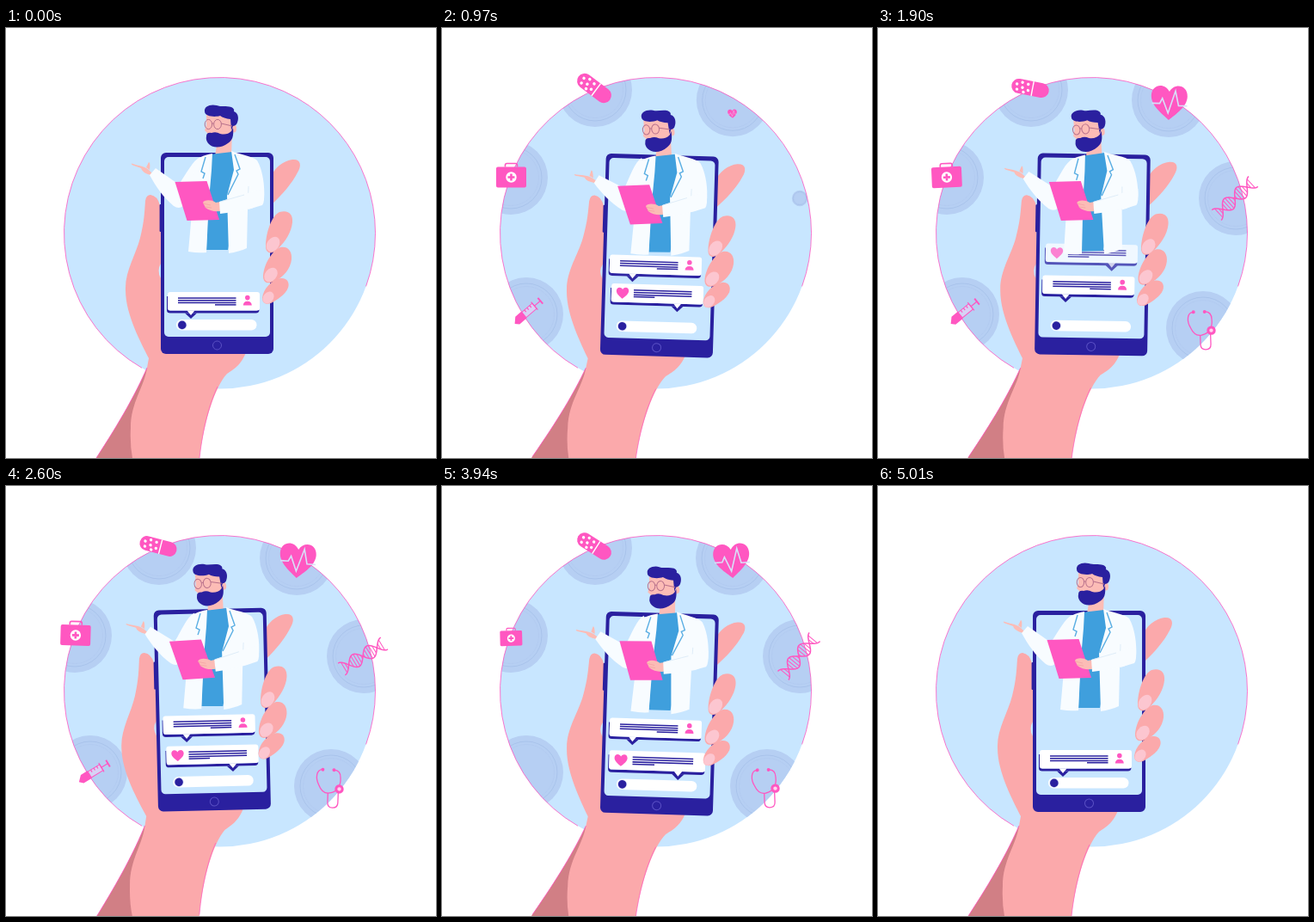
Recreate the animation shown at these times as an HTML page with a canvas. Size 500 by 500 pixels, loop 5050 ms.

```html
<!DOCTYPE html>
<html lang="en">
<head>
<meta charset="utf-8">
<title>Online doctor</title>
<style>
html, body { margin: 0; width: 100%; height: 100%; overflow: hidden; background: #fff; }
canvas { display: block; width: 500px; height: 500px; }
</style>
</head>
<body>
<canvas id="stage" width="500" height="500"></canvas>
<script>
const c = document.getElementById('stage').getContext('2d');
const LOOP = 5050, RAD = Math.PI / 180, TAU = Math.PI * 2;
const SKY = '#c8e6ff', NAVY = '#2a209f', PINK = '#ff57c1', SKIN = '#fba9ab',
  NAIL = '#fcc6d0', SHADE = '#d17f85', DISC = '#b6cff3', RING = '#a8c2ea',
  COAT = '#f8fcff', BLUE = '#3f9fdd', FACE = '#fcbcb6';

const clamp = x => Math.max(0, Math.min(1, x));
const smooth = x => (1 - Math.cos(Math.PI * clamp(x))) / 2;
const back = (x, k) => {
  const u = clamp(x) - 1;
  return 1 + (k + 1) * u ** 3 + k * u * u;
};

// Eased value through [time, value] points
function key(t, pts) {
  for (let i = 1; i < pts.length; i++) {
    const [a, va] = pts[i - 1], [b, vb] = pts[i];
    if (t <= b) return va + (vb - va) * smooth((t - a) / (b - a));
  }
  return pts[pts.length - 1][1];
}

function shape(d, fill, stroke, width = 1) {
  const p = new Path2D(d);
  if (fill) { c.fillStyle = fill; c.fill(p); }
  if (stroke) { c.strokeStyle = stroke; c.lineWidth = width; c.stroke(p); }
}
function oval(x, y, rx, ry, fill, stroke, width = 1, turn = 0) {
  c.beginPath();
  c.ellipse(x, y, rx, ry, turn * RAD, 0, TAU);
  if (fill) { c.fillStyle = fill; c.fill(); }
  if (stroke) { c.strokeStyle = stroke; c.lineWidth = width; c.stroke(); }
}
const dot = (x, y, r, fill, stroke, width) => oval(x, y, r, r, fill, stroke, width);
function box(x, y, w, h, r, fill) {
  c.beginPath();
  c.roundRect(x, y, w, h, r);
  c.fillStyle = fill;
  c.fill();
}
function turned(x, y, deg, draw, scale = 1) {
  c.save();
  c.translate(x, y);
  c.rotate(deg * RAD);
  c.scale(scale, scale);
  c.translate(-x, -y);
  draw();
  c.restore();
}

// Icons are drawn around their own centre
function pill() {
  box(-22, -8.5, 44, 17, 8.5, PINK);
  c.fillStyle = '#fff';
  c.fillRect(2, -8.5, 1.4, 17);
  [[-16, -2], [-15, 4], [-10, -5], [-9, 1], [-7, 6], [-3, -4], [-2, 3]]
    .forEach(([x, y]) => dot(x, y, 1.7, '#fff'));
}
function kit() {
  shape('M-7 -12V-14Q-7 -16 -5 -16H5Q7 -16 7 -14V-12', null, PINK, 1.6);
  box(-17.5, -12, 35, 24, 2, PINK);
  dot(0, 0, 6.2, '#fff');
  shape('M0 -4V4M-4 0H4', null, PINK, 2.6);
}
function syringe() {
  shape('M-23 1L-17 -5H-8V5H-19Z', PINK);
  shape('M-8 -4H8V4H-8Z', '#d7d2f5', PINK, 1);
  shape('M-4 -4V-1M0 -4V-1M4 -4V-1M8 -6V6M8 0H17', null, PINK, 1.2);
  shape('M17 -4.5V4.5', null, PINK, 2);
}
function heart() {
  shape('M0 20C-8 13 -21 4 -21 -8C-21 -21 -6 -24 0 -13C6 -24 21 -21 21 -8C21 4 8 13 0 20Z', PINK);
  shape('M-20 1H-11L-8 -5L-1 12L7 -14L11 3H21', null, '#d8e0f9', 1.6);
}
function dna() {
  const wave = x => 8 * Math.sin(x / 6.1);
  for (const side of [-1, 1]) {
    c.beginPath();
    for (let x = -29; x <= 29; x++) c.lineTo(x, side * wave(x));
    c.strokeStyle = PINK;
    c.lineWidth = 1.5;
    c.stroke();
  }
  for (let x = -25.5; x <= 26; x += 3.4) shape(`M${x} ${-wave(x)}V${wave(x)}`, null, PINK, 1);
}
function stethoscope() {
  shape('M-9 -20C-17 -20 -17 -9 -13 -2C-10 5 -5 8 0 7C8 6 13 -2 12 -11C12 -17 9 -20 4 -20', null, PINK, 1.3);
  shape('M-2 7V18Q-2 24 4 24Q10 24 10 18V6', null, PINK, 1.3);
  dot(-9, -20, 2, PINK);
  dot(4, -20, 2, PINK);
  dot(11, 2, 5.2, PINK);
  dot(11, 2, 2.2, '#ffd3ef');
}

// x, y: icon centre; px, py: pivot; tilt: [middle, swing, peak time]
const items = [
  { draw: syringe, x: 102.5, y: 329.5, px: 84, py: 346, disc: [98, 333], tilt: [-37, 6, 2750] },
  { draw: kit, x: 80.5, y: 173.5, px: 81, py: 187, disc: [80, 174], tilt: [0, 3, 3025] },
  { draw: pill, x: 177, y: 70, px: 177, py: 70, disc: [178, 72], tilt: [23, 15, 800] },
  { draw: heart, x: 338, y: 87, px: 338, py: 104, disc: [338, 84], tilt: [0, 4.5, 2400] },
  { draw: dna, x: 415, y: 198, px: 415, py: 198, disc: [416, 198], tilt: [-41, 10, 2650] },
  { draw: stethoscope, x: 376.5, y: 350, px: 377, py: 352, disc: [378, 349], tilt: [0, 3, 2900] }
];
const popped = (t, on, off, k) =>
  t < on || t > off + 220 ? 0 : t < off ? back((t - on) / 300, k) : 1 - smooth((t - off) / 250);

function discs(t) {
  c.save();
  c.beginPath();
  c.arc(248.5, 238.5, 181, 0, TAU);
  c.clip();
  items.forEach(({ disc: [x, y] }, i) => {
    const on = 100 + 200 * i, off = 3960 + 165 * i;
    const s = t < off ? smooth((t - on + 30) / 330) * (t > on) : popped(t, on, off, 0);
    if (s <= 0.01) return;
    dot(x, y, 43 * s, DISC);
    dot(x, y, 36 * s, null, RING, .9);
    dot(x, y, 32.5 * s, null, '#b0c9ef', .7);
  });
  c.restore();
}
function icons(t) {
  items.forEach((it, i) => {
    const s = popped(t, 350 + 200 * i, 3690 + 165 * i, 1);
    if (s <= 0.01) return;
    const [mid, swing, peak] = it.tilt;
    const wave = swing * Math.cos(TAU * (t - peak) / 2750);
    turned(it.px, it.py, wave, () => {
      c.translate(it.x, it.y);
      c.rotate(mid * RAD);
      it.draw();
    }, s);
  });
}

function hand() {
  shape('M98 512L105 500C133 457 151 425 164 395L166 384C157 366 139 333 139 305C138 283 151 264 156 244C161 224 161 214 162 201Q163 194 168 194Q176 195 179 206L184 372H281C275 391 266 396 257 402C243 417 230 458 225 500L224 512Z', SKIN);
  shape('M98 512L105 500C133 457 151 425 164 395C161 417 145 435 145 465Q144 484 147 500L148 512Z', SHADE);
  shape('M105 500C133 457 151 425 164 395', null, PINK, .8);
  shape('M246 417C237 436 229 464 225 500', null, PINK, .7);
  shape('M180 274Q175 282 180 291Z', SKY);
  shape('M308 206V174C311 163 323 154 333 153C343 152 344 160 339 168C333 180 322 193 308 206Z', SKIN);
}
function fingers() {
  shape('M302 254C302 238 309 218 318 214C328 211 334 216 333 226C332 237 325 248 317 256C310 264 302 263 302 254Z', SKIN);
  shape('M299 290C299 276 309 259 319 255C328 253 333 260 332 269C331 280 322 290 313 294C305 298 300 297 299 290Z', SKIN);
  shape('M298 314C299 303 309 293 319 291C327 290 330 296 328 302C325 310 315 316 308 320C302 322 298 320 298 314Z', SKIN);
  oval(310.5, 251.5, 7, 9.5, NAIL, null, 0, 35);
  oval(308, 287, 6.8, 9, NAIL, null, 0, 40);
  oval(305, 313.5, 5.8, 7.6, NAIL, null, 0, 40);
}
function phone() {
  box(178.6, 205, 3, 32, 1, NAVY);
  box(180, 145, 131, 234, 6, NAVY);
  box(184, 150, 123, 209, 5, SKY);
  dot(245.5, 369, 5, null, '#5a50c4', 1);
  box(198, 339, 93.5, 12.5, 6.2, '#fff');
  dot(204.8, 345.4, 5.6, '#dfe6fa');
  dot(204.8, 345.4, 4.8, NAVY);
}

function head() {
  shape('M246 130L263 118L262 149Q252 158 243 149Z', FACE);
  shape('M233 101L263 100L264 122L258 132H236L234 122L231 119L233 113Z', FACE);
  oval(265, 117, 3, 4.5, FACE);
  shape('M231 97C230 91 238 88 245 90C250 92 256 90 262 92Q266 94 265 97C271 99 271 107 268 112Q266 114 264 114L262 119L261 106Q253 105 249 102C243 104 231 103 231 97Z', NAVY);
  shape('M233 126Q233 121 239 122Q244 120 249 123Q257 125 262 120L264 116C265 126 263 131 258 134C250 140 240 140 235 134Q232 130 233 126Z', NAVY);
  oval(235.4, 112, 4.2, 5.6, null, '#b8718c', 1);
  oval(246, 112, 4.4, 5.6, null, '#b8718c', 1);
  shape('M239.6 111H241.6M250.4 111L263 114', null, '#b8718c', 1);
}
function wavingArm() {
  shape('M172 171L166 165C160 160 152 160 146 157.5Q145 159 150 160.5L157 163Q158 168 168 171Z', FACE);
  shape('M163 162L166 156Q168 156 167 165Z', FACE);
  shape('M174 163L201 182C210 169 217 154 226 150L229 178L206 207Q201 211 195 207C183 197 174 184 167 171Z', COAT);
}
function torso() {
  shape('M237 147L263 144L270 200L258 258H233Z', BLUE);
  shape('M240 146C229 148 222 151 220 157C215 171 218 185 216 215L212 260Q223 262 233 261L236 200L239 165Z', COAT);
  shape('M262 143C272 147 287 149 292 154C299 166 301 185 300 196Q299 207 281 211L280 256Q271 260 259 262L257 195L265 165Z', COAT);
  shape('M232 150L227 167L231 169L229 175', null, '#5aaee3', 1.4);
  shape('M266 147L272 164L268 166L270 170L258 194', null, '#5aaee3', 1.4);
  shape('M281 211L282 184', null, '#d9e9f7', .8);
}
function boardArm() {
  shape('M196.5 179L233.5 178L248 223L210.5 224Z', PINK);
  shape('M250 202L244 203C238 199 230 200 229 203L232 209Q238 214 249 213Z', FACE);
  shape('M229 204L238 206M231 208L239 209', null, '#f2a0a1', .7);
  shape('M248 202L281 192L300 187Q301 203 298 206Q277 213 249 216Z', COAT);
  shape('M249 202L277 194', null, '#d9e9f7', .8);
}
function doctor(t) {
  const body = key(t, [[0, 0], [970, -1.1], [1850, -2.5], [2600, 1.2], [3100, 1.8], [3940, 0], [LOOP, 0]]);
  const nod = key(t, [[0, 0], [970, -5.5], [1900, -4], [2600, -5], [3100, -5], [3940, -3], [LOOP, 0]]);
  const dip = key(t, [[0, 0], [970, 2], [1900, 3.3], [2600, 2], [3940, 1], [LOOP, 0]]);
  const wave = key(t, [[0, 0], [970, -9], [1900, -1], [2600, -3.5], [3100, -5], [3940, -8], [LOOP, 0]]);
  const board = key(t, [[0, 0], [970, -1.5], [1900, 1.5], [2600, -2], [3100, -4.5], [3940, 0], [LOOP, 0]]);
  turned(245, 260, body, () => {
    turned(215, 165, wave, wavingArm);
    turned(252, 185, nod, () => {
      c.translate(0, dip);
      head();
    });
    torso();
    turned(298, 200, board, boardArm);
  });
}

const LOW = 307, STEP = 38.5, MOVE = 350;
const shift = k => 20 + 850 * (k - 1);

function bubble(liked) {
  const x = liked ? 191 : 188, tail = liked ? 268 : 215;
  const text = liked ? 217 : 200, short = liked ? 217 : 243;
  const l = x - 1, r = x + 106.5;
  shape(`M${l} 5V21Q${l} 24.5 ${l + 4} 24.5H${r - 4}Q${r} 24.5 ${r} 20.5L${r - 3} 21.5H${x + 3}Q${x} 21.5 ${x} 18V5Z`, NAVY);
  shape(`M${tail - 7} 24.4L${tail} 31L${tail + 7} 24.4Z`, NAVY);
  box(x, 0, 107, 21.5, 3, '#fff');
  shape(`M${tail - 4.5} 21.4L${tail} 27L${tail + 4.5} 21.4Z`, '#fff');
  c.fillStyle = NAVY;
  for (const y of [6.3, 9, 11.7]) c.fillRect(text, y, 67.5, 1.5);
  c.fillRect(short, 14.1, 24.5, 1.5);
  if (liked) {
    shape('M204 17.5C201 15 196.8 12 196.8 8.3C196.8 4 202 3 204 6.8C206 3 211.2 4 211.2 8.3C211.2 12 207 15 204 17.5Z', PINK);
  } else {
    dot(280.8, 6.6, 2.8, PINK);
    shape('M275.8 15.5Q276 10.8 280.8 10.8Q285.6 10.8 285.8 15.5Z', PINK);
  }
}
function chat(t) {
  for (let k = 0; k <= 6; k++) {
    const born = k ? shift(k) + 320 : -1000;
    if (t < born) continue;
    const up = k < 6 ? clamp((t - shift(k + 1)) / MOVE) : 0;
    const leave = k === 5 ? 4620 : shift(k + 2);
    const out = k < 6 ? smooth((t - leave - 10) / MOVE) : 0;
    if (out >= 1) continue;
    const age = (t - born) / 330;
    c.save();
    c.globalAlpha = clamp(age * 3) * (1 - out ** 1.8);
    c.translate(0, LOW - STEP * (up + out));
    turned(242, 20, 0, () => bubble(k % 2 === 1), .5 + .5 * back(age, 1.6));
    c.restore();
  }
}

function frame(now) {
  const t = now % LOOP;
  c.clearRect(0, 0, 500, 500);
  dot(248.5, 238.5, 181, SKY);
  discs(t);
  c.beginPath();
  c.arc(248.5, 238.5, 181, 120 * RAD, 380 * RAD);
  c.strokeStyle = PINK;
  c.lineWidth = .8;
  c.stroke();
  const sway = key(t, [[0, 0], [1050, 1.75], [1560, 1.75], [2550, -1.35], [3750, 1.75], [3920, 1.75], [LOOP, 0]]);
  turned(160, 505, sway, () => {
    hand();
    phone();
    chat(t);
    doctor(t);
    fingers();
  });
  icons(t);
}

const start = performance.now();
function tick() {
  frame(performance.now() - start);
  requestAnimationFrame(tick);
}
tick();
</script>
</body>
</html>
```
